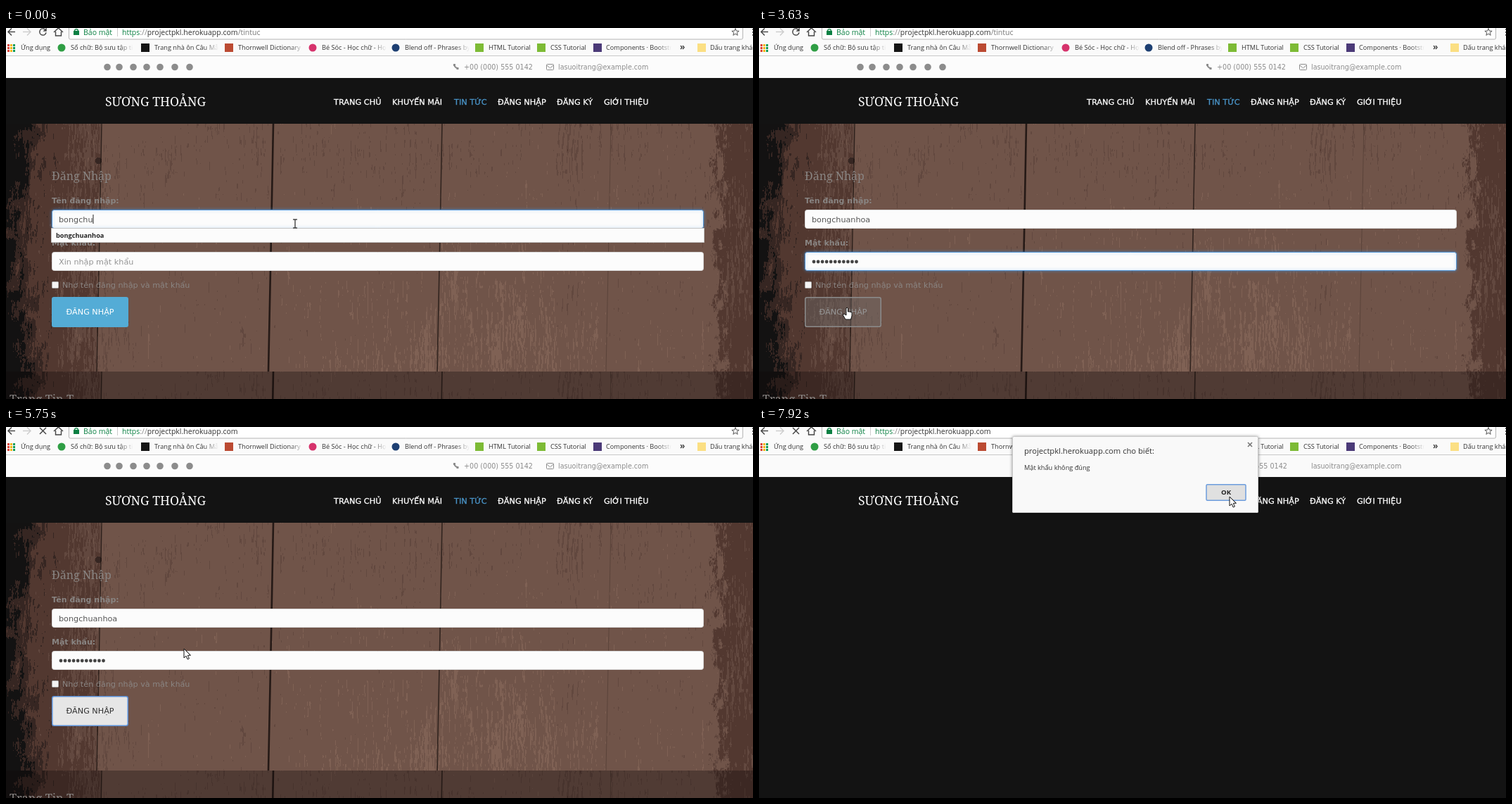
These frames come from a looping animation (1062 px wide and 527 px high, 8000 ms). An HTML page with a canvas:

```html
<!DOCTYPE html>
<html lang="vi">
<head>
<meta charset="utf-8">
<title>Đăng nhập</title>
<style>
html, body { margin: 0; width: 100%; height: 100%; overflow: hidden; background: #131313; }
canvas { display: block; width: 100%; height: 100%; }
</style>
</head>
<body>
<canvas id="stage" width="1062" height="527"></canvas>
<script>
const W = 1062, H = 527, LOOP = 8000;
const ctx = document.getElementById('stage').getContext('2d');
const UI = '"Open Sans", "Noto Sans", sans-serif';
const PAGE = '"DejaVu Sans", sans-serif';
const SERIF = '"Noto Serif", serif';
const USER = 'bongchuanhoa';
const HOST = 'projectpkl.herokuapp.com';

const clamp = v => Math.max(0, Math.min(1, v));
const lerp = (a, b, p) => a + (b - a) * p;
const mix = (a, b, p) => a.map((v, i) => lerp(v, b[i], p));
const rgba = c => `rgba(${c.join(',')})`;
// Progress in n equal jumps, the first one at t0
const steps = (t, t0, n, gap) => clamp((Math.floor((t - t0) / gap) + 1) / n);

function text(s, x, y, font, color, align = 'left') {
  ctx.font = font;
  ctx.fillStyle = color;
  ctx.textAlign = align;
  ctx.fillText(s, x, y);
  return ctx.measureText(s).width;
}
function rect(x, y, w, h, color) {
  ctx.fillStyle = color;
  ctx.fillRect(x, y, w, h);
}
function box(x, y, w, h, r, fill, stroke, line = 1) {
  ctx.beginPath();
  ctx.roundRect(x, y, w, h, r);
  if (fill) { ctx.fillStyle = fill; ctx.fill(); }
  if (stroke) { ctx.strokeStyle = stroke; ctx.lineWidth = line; ctx.stroke(); }
}
function disc(x, y, r, color) {
  ctx.beginPath();
  ctx.arc(x, y, r, 0, 7);
  ctx.fillStyle = color;
  ctx.fill();
}
function lines(points, color, width = 1.4, fill) {
  ctx.beginPath();
  points.forEach(([x, y], i) => i ? ctx.lineTo(x, y) : ctx.moveTo(x, y));
  if (fill) { ctx.closePath(); ctx.fillStyle = fill; ctx.fill(); }
  ctx.strokeStyle = color;
  ctx.lineWidth = width;
  ctx.stroke();
}

// Wood texture
function hash(i, j) {
  let n = Math.imul(i, 374761393) + Math.imul(j, 668265263) | 0;
  n = Math.imul(n ^ n >>> 13, 1274126177);
  return ((n ^ n >>> 16) >>> 0) / 2 ** 32;
}
function noise(x, y) {
  const i = Math.floor(x), j = Math.floor(y);
  let u = x - i, v = y - j;
  u *= u * (3 - 2 * u);
  v *= v * (3 - 2 * v);
  return lerp(lerp(hash(i, j), hash(i + 1, j), u), lerp(hash(i, j + 1), hash(i + 1, j + 1), u), v);
}
const TONES = [
  [.1, 19, 18, 18], [.27, 54, 38, 34], [.46, 82, 56, 48],
  [.54, 98, 72, 63], [.72, 112, 84, 73], [9, 127, 97, 84]
];
function makeWood(h) {
  const c = document.createElement('canvas');
  c.width = W;
  c.height = h;
  const g = c.getContext('2d'), img = g.createImageData(W, h);
  for (let y = 0; y < h; y++) for (let x = 0; x < W; x++) {
    const lean = x + 7 * y / h;
    const fibre = noise(x * 1.1, y * .16) * .55 + noise(x * .5 + 90, y * .03) * .45;
    const blotch = noise(x * .03 + 7, y * .02) - .5;
    const rough = (noise(x * .13, y * .07) - .5) * 34 + (noise(x * .7, y * .35) - .5) * 16;
    const bend = 9 * Math.cos(y / h * 6.3);
    const glow = Math.exp(-(((x - 640) / 300) ** 2));
    let v = .61 + (fibre - .5) * .25 + blotch * .07 + glow * (.11 * y / h - .01);
    v -= .62 * Math.exp(-Math.max(0, x + rough - bend - 3) / 38);
    v -= .21 * clamp((x + rough - 1008) / 12);
    if (lean < 136) v -= .1;
    if (Math.abs(x - 800) < 20) v -= .07 * Math.max(0, Math.sin((x - 800) * .9 + 4 * Math.sin(y * .03)));
    if (Math.hypot(x - 131, y - 52) < 5) v = .2;
    const tone = TONES.find(q => v < q[0]);
    img.data.set([tone[1], tone[2], tone[3], 255], (y * W + x) * 4);
  }
  g.putImageData(img, 0, 0);
  [[136, 1.4, .7], [380, 2.6, .85], [620, 1.6, .7], [860, 1, .25]].forEach(([x, w, a]) => {
    g.strokeStyle = `rgba(24,16,14,${a})`;
    g.lineWidth = w;
    g.beginPath();
    g.moveTo(x, 0);
    g.lineTo(x - 3, h * .45);
    g.lineTo(x - 7, h);
    g.stroke();
  });
  return c;
}
const wood = makeWood(352);

// Browser toolbar
function bookmark(x, color, label, tx, end, round) {
  if (round) disc(x + 6, 28, 5.5, color);
  else rect(x, 22, 12, 12, color);
  let ink = '#333';
  if (end) {
    ink = ctx.createLinearGradient(end - 20, 0, end, 0);
    ink.addColorStop(0, '#333');
    ink.addColorStop(1, 'rgba(51,51,51,0)');
  }
  text(label, tx, 31, '9.2px ' + UI, ink);
}
function toolbar(loading, path) {
  rect(0, 0, W, 40, '#fafafa');
  box(89.5, -8, 958, 24, 2, '#fff', '#b4b4b4');
  lines([[13, 5.5], [3, 5.5]], '#444');
  lines([[8, .5], [3, 5.5], [8, 10.5]], '#444');
  lines([[24, 5.5], [35, 5.5]], '#ccc');
  lines([[30, .5], [35, 5.5], [30, 10.5]], '#ccc');
  if (loading) {
    lines([[48, 1], [57, 10]], '#444');
    lines([[57, 1], [48, 10]], '#444');
  } else {
    ctx.beginPath();
    ctx.arc(52.5, 5.5, 4.6, .2, 5.4);
    ctx.strokeStyle = '#444';
    ctx.lineWidth = 1.5;
    ctx.stroke();
    lines([[57.5, 0], [57.5, 4.5], [53, 4.5]], '#444', .5, '#444');
  }
  lines([[68, 6], [74.5, 0], [81, 6]], '#444');
  lines([[70.5, 5], [70.5, 11], [78.5, 11], [78.5, 5]], '#444');
  rect(96, 4, 8, 6, '#0b8043');
  ctx.beginPath();
  ctx.arc(100, 4, 2.4, Math.PI, 0);
  ctx.strokeStyle = '#0b8043';
  ctx.lineWidth = 1.3;
  ctx.stroke();
  const font = '10.5px ' + UI;
  text('Bảo mật', 110, 9.5, font, '#0b8043');
  rect(158, 0, 1, 12, '#ccc');
  let x = 165;
  [['https', '#0b8043'], ['://', '#888'], [HOST, '#333'], [path, '#777']].forEach(([s, c]) => {
    x += text(s, x, 9.5, font, c);
  });
  const star = [];
  for (let i = 0; i <= 10; i++) {
    const r = i % 2 ? 2.3 : 5.4, a = i * Math.PI / 5 - Math.PI / 2;
    star.push([1037 + r * Math.cos(a), 6 + r * Math.sin(a)]);
  }
  lines(star, '#555', 1);
  [1, 5, 9].forEach(y => rect(1061, y, 1, 2, '#555'));

  const dots = ['#db4437', '#f4b400', '#0f9d58', '#4285f4'];
  for (let i = 0; i < 9; i++) rect(2 + i % 3 * 4, 23 + Math.floor(i / 3) * 4, 3, 3, dots[(i + Math.floor(i / 3)) % 4]);
  text('Ứng dụng', 21, 31, '9.2px ' + UI, '#333');
  bookmark(73, '#2f9e44', 'Sổ chữ: Bộ sưu tập tiếng', 92, 181, true);
  bookmark(192, '#151515', 'Trang nhà ôn Câu Mẫu', 211, 302);
  bookmark(311, '#bb4a32', 'Thornwell Dictionary', 330, 424);
  bookmark(430, '#d6336c', 'Bé Sóc - Học chữ - Học t', 449, 541, true);
  bookmark(548, '#1d3f72', 'Blend off - Phrases by', 567, 659, true);
  bookmark(667, '#7dbb35', 'HTML Tutorial', 686);
  bookmark(755, '#7dbb35', 'CSS Tutorial', 774);
  bookmark(835, '#4b3a78', 'Components · Bootstrap', 853, 946);
  text('»', 958, 31, 'bold 12px ' + UI, '#444');
  bookmark(983, '#fbdf83', 'Dấu trang khác', 1001);
  rect(0, 39, W, 1, '#c9c9c9');
}

// Site header
function header(bare) {
  rect(0, 40, W, 31, bare ? '#fafafa' : '#fcfcfc');
  const grey = '#8c8c8c';
  if (!bare) {
    [144, 161, 181, 200, 219, 240, 261].forEach(x => disc(x, 55.5, 4.8, grey));
    ctx.beginPath();
    ctx.arc(642.5, 52, 5, .55 * Math.PI, 1.02 * Math.PI);
    ctx.strokeStyle = grey;
    ctx.lineWidth = 2.2;
    ctx.stroke();
    rect(636, 51, 3, 3, grey);
    rect(640.5, 56, 3, 3, grey);
    box(768.5, 51.5, 10, 8, 1, null, grey);
    lines([[769, 53], [773.5, 57], [778, 53]], grey, 1);
  }
  text('+00 (000) 555 0142', bare ? 653 : 651, 59, '9.6px ' + PAGE, grey);
  text('lasuoitrang@example.com', 785, 59, '9.6px ' + PAGE, grey);
  rect(0, 71, W, 65, '#131313');
  text('SƯƠNG THOẢNG', 141, 111, '17.6px ' + SERIF, '#fff');
  [['TRANG CHỦ', 466], ['KHUYẾN MÃI', 549], ['TIN TỨC', 637], ['ĐĂNG NHẬP', 699], ['ĐĂNG KÝ', 783], ['GIỚI THIỆU', 850]]
    .forEach(([s, x], i) => {
      const color = i === 2 && !bare ? '#4a95c9' : '#fff';
      text(s, x, 108.5, '11.3px ' + PAGE, color);
      ctx.strokeStyle = color;
      ctx.lineWidth = .3;
      ctx.strokeText(s, x, 108.5);
    });
}

// Login form
const BLUE = [[84, 172, 214, 1], [84, 172, 214, 1], [255, 255, 255, 1]];
const HOVER = [[110, 110, 110, .38], [140, 140, 140, 1], [150, 150, 150, 1]];
const FOCUS = [[110, 110, 110, 0], [77, 127, 200, 1], [138, 138, 138, 1]];
const LIGHT = [[230, 230, 230, 1], [90, 143, 214, 1], [51, 51, 51, 1]];
const blend = (a, b, p) => a.map((c, i) => mix(c, b[i], p));

function button(t) {
  let s = blend(BLUE, HOVER, steps(t, 3370, 3, 130));
  s = blend(s, FOCUS, steps(t, 3780, 4, 142));
  s = blend(s, LIGHT, steps(t, 5184, 5, 141));
  box(65.75, 382.75, 107.5, 41.5, 2.5, rgba(s[0]), rgba(s[1]), 1.5);
  text('ĐĂNG NHẬP', 119.5, 406.5, '11.2px ' + PAGE, rgba(s[2]), 'center');
}
function field(y, focus) {
  ctx.save();
  if (focus) {
    ctx.shadowColor = `rgba(70,150,230,${focus * .55})`;
    ctx.shadowBlur = 4;
  }
  box(65.5, y + .5, 926, 26, 3, '#fcfcfc', rgba(mix([216, 216, 216, 1], [85, 150, 212, 1], focus)));
  ctx.restore();
}
function caret(x, y) { rect(x, y, 1, 13, '#222'); }

function form(t) {
  ctx.drawImage(wood, 0, 136);
  ctx.drawImage(wood, 0, 0, W, 39, 0, 488, W, 39);
  rect(0, 488, W, 39, 'rgba(14,8,7,.32)');
  const grey = '#898583', body = '11.2px ' + PAGE, bold = 'bold 11px ' + PAGE;
  text('Đăng Nhập', 65, 215.5, '16px ' + SERIF, grey);
  text('Trang Tin T', 5, 532.5, '16.5px ' + SERIF, grey);
  text('Tên đăng nhập:', 65, 249, bold, grey);
  text('Mật khẩu:', 65, 309, bold, grey);

  const toPass = steps(t, 1100, 2, 120);
  field(258, 1 - toPass);
  field(318, t < 3780 ? toPass : 0);

  const typed = 7 + 3 * steps(t, 130, 3, 125) + 2 * steps(t, 660, 2, 150);
  const w = text(USER.slice(0, Math.round(typed)), 75, 276, body, '#555');
  if (t < 1100) {
    caret(75 + w, 265);
    box(64.5, 284.5, 928, 20, 0, '#fcfcfc', '#c4c4c4');
    text(USER, 71, 298, 'bold 9.2px ' + UI, '#222');
  }

  const count = Math.min(11, Math.round(12 * steps(t, 1600, 6, 132)));
  if (count) for (let i = 0; i < count; i++) disc(78 + i * 6.05, 332, 2.4, '#444');
  else text('Xin nhập mật khẩu', 75, 336, body, '#949494');
  if (t >= 1100 && t < 2974) caret(count ? 75.5 + count * 6.05 : 75, 325);

  box(65.5, 360.5, 9, 9, 1, '#f4f4f4', '#aaa');
  text('Nhớ tên đăng nhập và mật khẩu', 80, 369, body, '#8a8583');
  button(t);
}

// Alert
function dialog(t, over) {
  const fresh = t < 6330;
  ctx.save();
  ctx.translate(0, fresh ? 1 : 0);
  ctx.globalAlpha = fresh ? .94 : 1;
  ctx.shadowColor = 'rgba(0,0,0,.45)';
  ctx.shadowBlur = 4;
  box(360, 13.5, 350, 108.5, 2, '#f9f9f9');
  ctx.shadowBlur = 0;
  ctx.shadowColor = 'transparent';
  box(360.5, 13.5, 349, 108, 2, null, '#c8c8c8');
  text(HOST + ' cho biết:', 377, 37.5, '11.2px ' + UI, '#333');
  text('Mật khẩu không đúng', 377, 60.5, '9.2px ' + UI, '#333');
  lines([[695, 22], [701, 28]], '#777', 1.6);
  lines([[701, 22], [695, 28]], '#777', 1.6);
  box(636, 81.7, 56, 22.6, 1.5, over ? '#e0e0e0' : '#ececec', '#6d9ddd', 1.5);
  text('OK', 664, 96, 'bold 9.6px ' + UI, '#222', 'center');
  ctx.restore();
}

// Pointer
function arrow() {
  lines([[0, 0], [0, 13], [3, 10.2], [5.2, 15], [7.4, 14], [5.3, 9.4], [9.3, 9.2]], '#111', 1, '#fff');
  lines([[0, 0], [9.3, 9.2]], '#111', 1);
}
function beam() {
  lines([[-3, -6], [3, -6]], '#222', 1.2);
  lines([[0, -6], [0, 6]], '#222', 1.2);
  lines([[-3, 6], [3, 6]], '#222', 1.2);
}
function hand() {
  lines([[-1, 1], [0, 0], [1.5, 1], [1.5, 6], [4, 6], [7, 7], [7, 12], [5.5, 17], [-2, 17], [-5.5, 11], [-5, 9.5], [-3.5, 9.5], [-1, 11], [-1, 1]], '#111', 1, '#fff');
}
function pointer(t) {
  const legs = [
    [2840, 5, 132, 125, 397], [4900, 7, 141, 253, 315],
    [6190, 1, 140, 269, 299], [6330, 7, 146, 575, 106], [7360, 5, 140, 669, 99]
  ];
  let x = 411, y = 278;
  for (const [t0, n, gap, tx, ty] of legs) {
    const p = steps(t, t0, n, gap);
    x = lerp(x, tx, p);
    y = lerp(y, ty, p);
  }
  return [x, y];
}
const inside = (x, y, l, t, r, b) => x >= l && x <= r && y >= t && y <= b;

function draw(t) {
  const alert = t >= 6190, [x, y] = pointer(t);
  toolbar(t >= 3780, t < 4900 ? '/tintuc' : '');
  header(alert);
  if (alert) {
    rect(0, 136, W, H - 136, '#131313');
    dialog(t, inside(x, y, 636, 82, 692, 105));
  } else form(t);
  let shape = arrow;
  if (!alert && (inside(x, y, 65, 258, 992, 285) || inside(x, y, 65, 318, 992, 345))) shape = beam;
  if (!alert && inside(x, y, 65, 382, 174, 425)) shape = hand;
  ctx.save();
  ctx.translate(x, y);
  shape();
  ctx.restore();
}

const start = performance.now();
function tick() {
  draw((performance.now() - start) % LOOP);
  requestAnimationFrame(tick);
}
tick();
</script>
</body>
</html>
```
